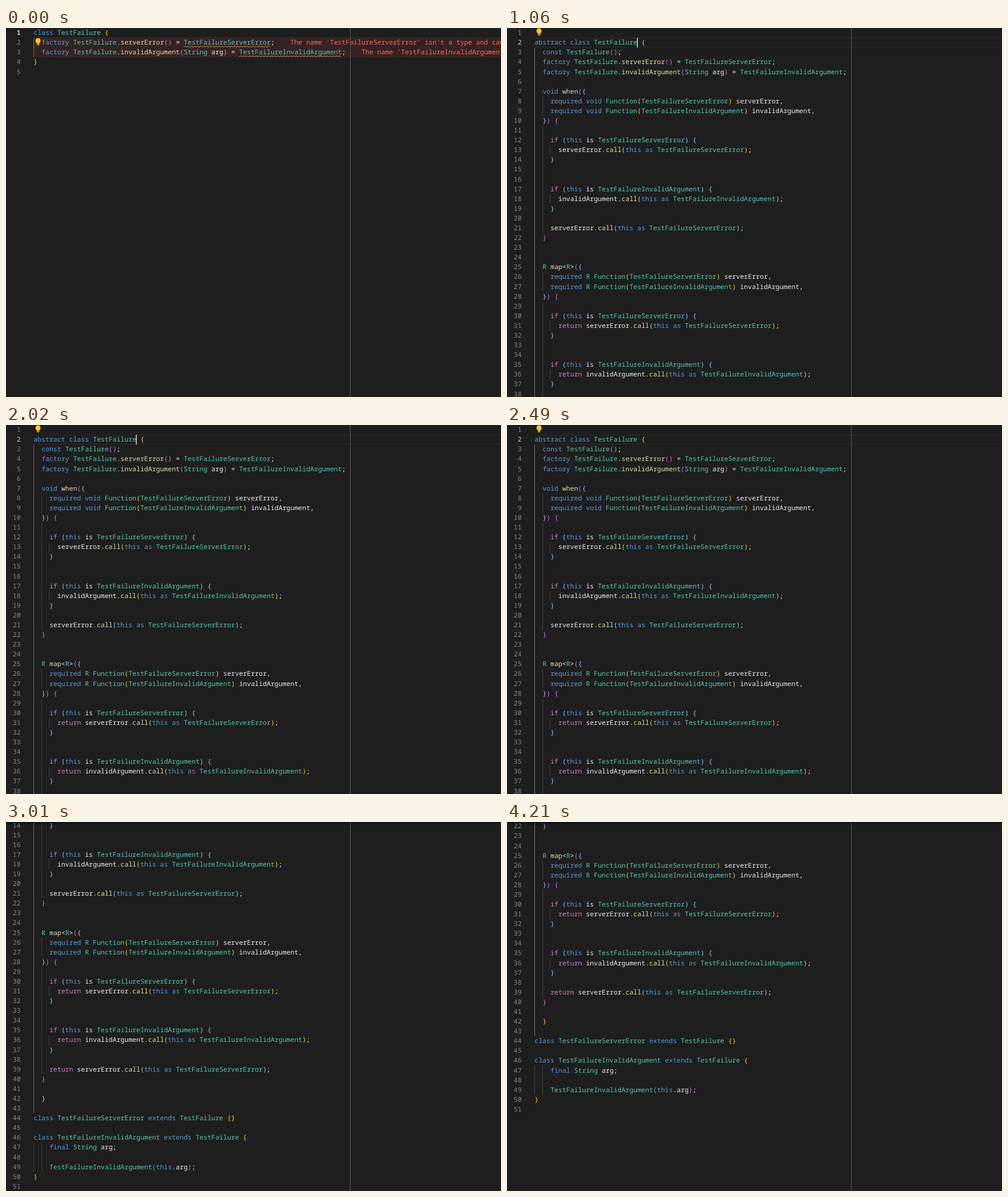
Animation, 866 px wide and 646 px high, one loop 4290 ms. Source, as an HTML page:

```html
<!DOCTYPE html>
<html lang="en">
<head>
<meta charset="utf-8">
<title>Code generation</title>
<style>
html, body { margin: 0; width: 100%; height: 100%; overflow: hidden; background: #1e1e1e; }
#stage { position: relative; width: 866px; height: 646px; overflow: hidden; background: #1e1e1e;
  color: #ececec; font: 500 11.533px/17.09px "Noto Sans Mono", "DejaVu Sans Mono", monospace;
  text-rendering: geometricPrecision; font-variant-ligatures: none; }
#stage div, #stage svg { position: absolute; }
.scene { left: 0; top: 0; width: 866px; height: 900px; }
.line { left: 48.3px; white-space: pre; margin-top: .2px; }
.num { left: 0; width: 25.6px; text-align: right; color: #858585; margin-top: .2px; }
.row { left: 49px; right: 0; height: 17.09px; box-sizing: border-box; border: solid #292929; border-width: 1.8px 0; }
.bad { left: 48.5px; right: 0; height: 17.09px; background: #352323; }
.guide { width: 1px; background: #404040; }
.guide.on { background: #707070; }
.caret { width: 2px; height: 17px; background: #aeafad; }
.ruler { left: 602px; top: 0; width: 1px; height: 646px; background: #5a5a5a; }
.shadow { left: 0; top: 0; width: 866px; height: 6px; box-shadow: inset 0 6px 6px -6px #000; }
.key { color: #569cd6; }
.flow { color: #c586c0; }
.type { color: #4ec9b0; }
.func { color: #dcdcaa; }
.err { color: #ff6464; }
</style>
</head>
<body>
<div id="stage"></div>
<script>
const LINE = 17.09, COL = 6.92, LEFT = 48.3, LOOP = 4290, NOTCH = 44.97;
const BRACKETS = ['#ffd700', '#da70d6', '#87cefa'];
const SERVER = 'TestFailureServerError', INVALID = 'TestFailureInvalidArgument';
const stage = document.getElementById('stage');

const factories = `  factory TestFailure.serverError() = ${SERVER};
  factory TestFailure.invalidArgument(String arg) = ${INVALID};`;

const check = (type, name, ret) => `    if (this is ${type}) {
      ${ret}${name}.call(this as ${type});
    }`;

const method = (head, out, ret) => `  ${head}({
    required ${out} Function(${SERVER}) serverError,
    required ${out} Function(${INVALID}) invalidArgument,
  }) {

${check(SERVER, 'serverError', ret)}


${check(INVALID, 'invalidArgument', ret)}

    ${ret}serverError.call(this as ${SERVER});
  }`;

const before = `class TestFailure {
${factories}
}
`;

const after = `
abstract class TestFailure {
  const TestFailure();
${factories}

${method('void when', 'void', '')}


${method('R map<R>', 'R', 'return ')}

  }

class ${SERVER} extends TestFailure {}

class ${INVALID} extends TestFailure {
    final String arg;

    ${INVALID}(this.arg);
}
`;

function add(parent, cls, style = {}, text = '') {
  const el = document.createElement('div');
  el.className = cls;
  el.textContent = text;
  Object.assign(el.style, style);
  parent.append(el);
  return el;
}

function span(parent, text, cls, color) {
  const el = document.createElement('span');
  el.textContent = text;
  if (cls) el.className = cls;
  if (color) el.style.color = color;
  parent.append(el);
}

function svg(parent, x, y, w, h, body) {
  const el = document.createElementNS('http://www.w3.org/2000/svg', 'svg');
  el.setAttribute('width', w);
  el.setAttribute('height', h);
  el.style.left = x + 'px';
  el.style.top = y + 'px';
  el.innerHTML = body;
  parent.append(el);
}

const topOf = n => (n - 1) * LINE + 'px';
const leftOf = col => LEFT + col * COL;

const TOKEN = /\b(if|return)\b|\b(abstract|class|const|factory|void|required|this|as|extends|final)\b|\b([A-Z]\w*)|\b([a-z]\w*)(?=[(<])|([(){}])|\w+|[^\w(){}]+/g;

function writeLine(el, text, depth) {
  for (const m of text.matchAll(TOKEN)) {
    const kind = ['flow', 'key', 'type', 'func'].find((_, i) => m[i + 1]);
    if (m[5]) {
      const open = '({'.includes(m[5]);
      if (!open) depth--;
      span(el, m[5], '', BRACKETS[depth % 3]);
      if (open) depth++;
    } else span(el, m[0], kind);
  }
  return depth;
}

function bulb(scene, y) {
  svg(scene, 50, y, 12, 14, `<path fill="#fc0" d="M6 .6a4.5 4.5 0 0 0-2.6 8.1V10h5.2V8.7A4.5 4.5 0 0 0 6 .6z"/>
    <path fill="#e0b000" d="M3.8 10.4h4.4v1.6l-1 1H4.8l-1-1z"/>`);
}

function squiggle(scene, line, col, len) {
  const w = len * COL, step = 2.7;
  let d = 'M0 2.6';
  for (let i = 1; i * step <= w; i++) d += `L${i * step} ${i % 2 ? .6 : 2.6}`;
  svg(scene, leftOf(col), line * LINE - 3.2, w, 3.4,
    `<path d="${d}" fill="none" stroke="#f48771" stroke-width=".95"/>`);
}

function buildScene(code, active, guides, errors = []) {
  const scene = add(stage, 'scene');
  add(scene, 'row', { top: topOf(active) });
  errors.forEach(e => add(scene, 'bad', { top: topOf(e.line) }));
  for (const [col, from, to, on] of guides)
    add(scene, on ? 'guide on' : 'guide',
      { left: Math.floor(leftOf(col)) + 'px', top: topOf(from), height: (to - from + 1) * LINE + 'px' });
  let depth = 0;
  code.split('\n').forEach((text, i) => {
    const n = i + 1;
    const num = add(scene, 'num', { top: topOf(n) }, n);
    if (n === active) num.style.color = '#d0d0c6';
    const el = add(scene, 'line', { top: topOf(n) });
    depth = writeLine(el, text, depth);
    const e = errors.find(e => e.line === n);
    if (e) {
      span(el, `    The name '${e.type}' isn't a type and can't be used as a redirected constructor.`, 'err');
      squiggle(scene, n, text.indexOf(e.type), e.type.length);
    }
  });
  return scene;
}

const draft = buildScene(before, 1, [[0, 2, 3, true]],
  [{ line: 2, type: SERVER }, { line: 3, type: INVALID }]);
draft.querySelector('.num').style.fontWeight = 'bold';
bulb(draft, 17);

const full = buildScene(after, 2, [
  [0, 3, 43, true], [0, 47, 49], [2, 47, 49],
  [2, 8, 9], [2, 11, 21], [2, 26, 27], [2, 29, 39],
  [4, 13, 13], [4, 18, 18], [4, 31, 31], [4, 36, 36]
]);
bulb(full, 0);

const draftCaret = add(draft, 'caret', { left: '165px', top: '0' });
const caret = add(full, 'caret', { left: '227px', top: '17px' });
add(stage, 'ruler');
const shadow = add(stage, 'shadow');

const GENERATED = 1060;
const BLINKS = [980, 1510, 2020, 2490];
const SCROLLS = [2820, 2870, 2910, 2960, 3010, 3570, 3820, 4210];
const passed = (times, t) => times.filter(x => t >= x).length;
const show = (el, on) => { el.style.visibility = on ? 'inherit' : 'hidden'; };

function render(t) {
  const lit = passed(BLINKS, t) % 2 === 1;
  const notches = passed(SCROLLS, t);
  show(draft, t < GENERATED);
  show(full, t >= GENERATED);
  show(draftCaret, lit);
  show(caret, lit);
  show(shadow, notches > 0);
  full.style.top = -notches * NOTCH + 'px';
}

const start = performance.now();
function tick() {
  render((performance.now() - start) % LOOP);
  requestAnimationFrame(tick);
}
render(0);
requestAnimationFrame(tick);
</script>
</body>
</html>
```
